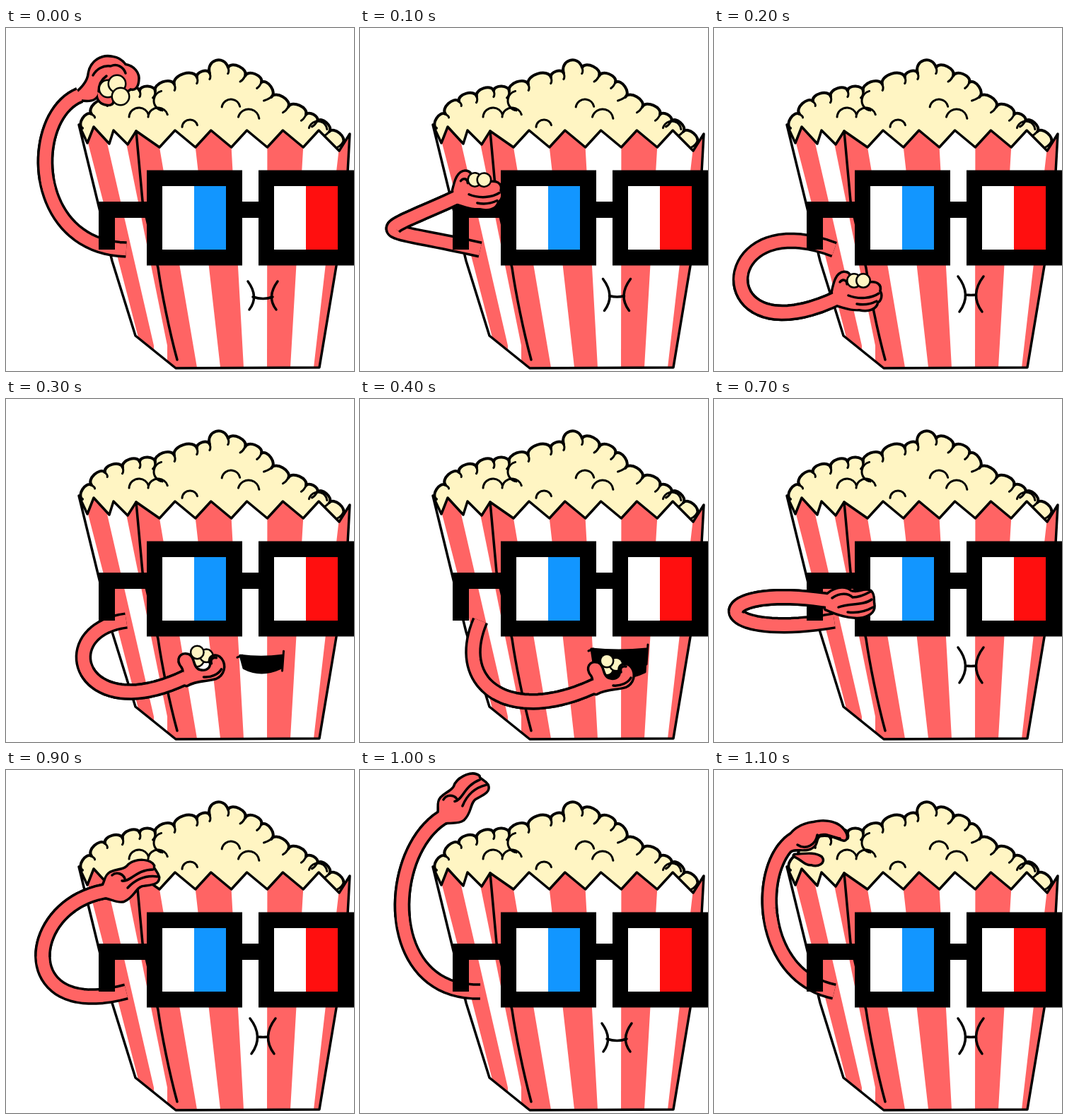
Write an HTML page with a canvas that moves like this. It is 492x486 px and loops after 1200 ms.

```html
<!DOCTYPE html>
<html lang="en">
<head>
<meta charset="utf-8">
<title>Popcorn snack</title>
<style>
html, body { margin: 0; width: 100%; height: 100%; overflow: hidden; background: #fff; }
canvas { display: block; width: 492px; height: 486px; }
</style>
</head>
<body>
<canvas id="stage" width="492" height="486"></canvas>
<script>
const ctx = document.getElementById('stage').getContext('2d');
const PINK = '#ff6464', CORN = '#fff5c3', INK = '#000';
const STEP = 50, LOOP = 1200, LAST = 1100;

const lerp = (a, b, k) => a + (b - a) * k;
const mix = (a, b, k) => a.map((v, i) => lerp(v, b[i], k));

function ink(path, width = 3.5, color = INK) {
  ctx.strokeStyle = color;
  ctx.lineWidth = width;
  ctx.stroke(path);
}

function fill(path, color) {
  ctx.fillStyle = color;
  ctx.fill(path);
}

function rect(color, x, y, w, h) {
  ctx.fillStyle = color;
  ctx.fillRect(x, y, w, h);
}

function poly(points, close = true) {
  const p = new Path2D();
  points.forEach(([x, y]) => p.lineTo(x, y));
  if (close) p.closePath();
  return p;
}

/* ---------- box ---------- */
const rim = [[103, 137], [115, 163], [124, 140], [146, 164], [152, 145], [172, 165], [184, 146]];
for (let i = 0; i < 6; i++) {
  rim.push([217 + 50.8 * i, 169 + (i === 5 ? 5 : 0)]);
  rim.push([239 + 50.8 * i - (i === 5 ? 7 : 0), 145 + (i === 5 ? 5 : 0)]);
}
const box = poly([...rim, [483, 205], [467, 337], [443, 481], [240, 482], [183, 436], [150, 330]]);
const fold = new Path2D('M184 146L193 245L215 340C220 375 231 430 242 470');

// Stripe edges run straight from the rim to the floor on each side of the box.
const sideEdge = i => [[116 + 27 * i, 140], [116 + 27 * i, 163], [190 + 19 * i, 450], [190 + 19 * i, 486]];
const frontEdge = i => [[217 + 50.8 * i, 130], [217 + 50.8 * i, 169], [270 + 33 * i, 481], [270 + 33 * i, 486]];
const stripe = (a, b) => poly([...a, ...b.reverse()]);
const stripes = [stripe(sideEdge(0), sideEdge(1)), stripe(sideEdge(2), frontEdge(0))];
for (let i = 1; i < 6; i += 2) stripes.push(stripe(frontEdge(i), frontEdge(i + 1)));

function drawBox() {
  fill(box, '#fff');
  ctx.save();
  ctx.clip(box);
  stripes.forEach(s => fill(s, PINK));
  ctx.restore();
  ink(fold);
  ink(box);
}

/* ---------- popcorn ---------- */
// Joints between the outer bumps; every bump ends in a short hook into the pile.
const joints = [[108, 142], [121, 122], [140, 104], [165, 97], [189, 89], [211, 90], [238, 80],
  [270, 70], [288, 64], [314, 56], [338, 68], [361, 77], [375, 98], [399, 112], [424, 123],
  [440, 132], [457, 147], [476, 163]];
const pile = new Path2D(), hooks = new Path2D();
pile.moveTo(...joints[0]);
for (let i = 1; i < joints.length; i++) {
  const [ax, ay] = joints[i - 1], [bx, by] = joints[i];
  const bulge = i === 9 ? .72 : .42;
  const ox = (by - ay) * bulge, oy = (ax - bx) * bulge;
  pile.bezierCurveTo(ax + ox, ay + oy, bx + ox, by + oy, bx, by);
  const reach = 9 / Math.hypot(ox, oy);
  hooks.moveTo(bx, by);
  hooks.quadraticCurveTo(bx - ox * reach * .7, by - oy * reach * .7, bx - ox * reach - 3, by - oy * reach);
}
const pileFill = new Path2D(pile);
pileFill.lineTo(470, 180);
pileFill.lineTo(115, 180);

// Inner kernels: centre, radius and lean of a rounded cap.
for (const [x, y, r, lean] of [[188, 127, 14, 0], [215, 127, 14, 0], [318, 114, 13, .1],
  [343, 130, 15, .2], [260, 141, 11, 0], [441, 145, 13, .2], [223, 103, 14, -1.5]]) {
  const cap = new Path2D();
  cap.arc(x, y, r, Math.PI * 1.02 + lean, Math.PI * 1.9 + lean);
  hooks.addPath(cap);
}

function drawPopcorn() {
  fill(pileFill, CORN);
  ink(pile, 4);
  ink(hooks, 3);
}

function drawLobes(lobes, r) {
  for (const [x, y] of lobes) {
    const p = new Path2D();
    p.arc(x, y, r, 0, Math.PI * 2);
    ink(p, 5);
    fill(p, CORN);
  }
}

/* ---------- glasses ---------- */
function lens(x, tint) {
  rect(INK, x, 201.5, 135, 135);
  rect('#fff', x + 22, 224, 45, 90);
  rect(tint, x + 67, 224, 45, 90);
}

function drawGlasses() {
  rect(INK, 131, 246, 70, 23);
  rect(INK, 131, 246, 23, 68);
  rect(INK, 330, 246, 30, 23);
  lens(199, '#1296ff');
  lens(357, '#ff0f0f');
}

/* ---------- hands ---------- */
const hand = (skin, lines, lobes = [], size = 0, behind = false) =>
  ({ skin: new Path2D(skin), lines: new Path2D(lines), lobes, size, behind });

const grab = hand(
  `M98 94C108 86 117 76 118 64C121 47 136 39 150 42C158 43 164 47 168 53C180 55 188 64 186 75
   C185 84 181 87 176 85L150 103C151 107 146 109 140 107C132 105 129 98 130 92C127 102 118 103 106 101Z`,
  'M123 67C128 58 137 53 147 54M148 54C157 50 166 55 169 64M131 90C131 80 135 73 142 68',
  [[144, 86], [157, 79], [162, 97]], 11);

const fist = hand(
  `M168 374C171 360 174 348 184 347C190 347 192 351 192 357L216 363C228 359 236 364 233 373
   C237 378 235 386 230 388C229 397 218 401 206 398C192 399 182 394 170 391Z`,
  'M190 379C205 385 223 383 233 376M202 391C212 393 222 391 230 387M178 360C182 355 188 357 188 363',
  [[198, 358], [211, 358]], 8.5);

const feed = hand(
  `M316 413C330 405 333 399 328 391C320 381 326 372 336 375C344 379 341 390 349 396
   C358 401 369 397 369 387C364 378 376 373 382 381C389 390 385 403 375 407C362 411 348 409 334 417Z`,
  'M358 406C369 407 379 402 383 395M369 387C367 380 372 378 376 379',
  [[349, 382], [362, 376], [349, 371]], 8, true);

const open = hand(
  `M228 388C238 384 239 373 246 365C254 358 266 361 264 370C263 378 257 384 260 390
   C272 390 280 377 290 376C298 375 300 382 295 388C303 391 301 402 295 406C284 412 258 409 232 406Z`,
  'M262 400C276 402 292 398 297 388M252 389C262 393 274 390 281 384');

const reach = hand(
  `M158 280C168 269 184 265 193 273C204 277 212 269 221 273C226 278 224 284 225 290
   C227 300 221 305 210 308C192 311 172 303 158 297Z`,
  'M167 282C178 274 190 275 196 281C206 281 214 277 221 273M176 295C191 289 211 293 223 284M189 302C204 304 216 300 225 295');

const flat = hand(
  `M134 168C142 162 139 151 148 146C160 141 168 143 174 135C184 127 203 127 208 136
   C206 140 213 144 215 152C215 161 206 161 192 163C182 166 180 179 166 185C158 187 150 182 141 180Z`,
  'M150 149C157 143 166 148 168 154M164 157C176 159 184 141 208 141M172 167C184 154 198 149 214 151');

const dip = hand(
  `M102 103C110 85 124 77 142 75C158 71 176 75 183 86C189 94 187 100 182 98
   C174 96 166 90 150 92C142 95 146 104 140 108C130 116 118 109 108 114Z
   M114 121C126 121 140 117 151 124C157 131 146 136 138 133C130 134 126 127 114 121Z`,
  'M118 106C130 114 144 106 146 92M148 93C157 88 168 96 178 97');

/* ---------- poses ---------- */
// An arm is one cubic from the shoulder: two control points and the wrist.
const SHOULDER = [170, 314];
const heading = arm => Math.atan2(arm[5] - arm[3], arm[4] - arm[2]);
const poses = [];
function pose(t, arm, hand, chew, gape) {
  hand.home ??= arm;
  poses.push({ t, arm, hand, mouth: [chew, gape] });
}

const feeding = [130, 408, 215, 462, 333, 406];
pose(0, [32, 310, 30, 125, 104, 95], grab, 0, 0);
pose(200, [-5, 247, -10, 472, 176, 382], fist, 1, 0);
pose(400, feeding, feed, 1, 1);
pose(500, feeding, feed, 1, 1);
pose(600, [40, 305, 107, 475, 238, 395], open, 1, .62);
pose(700, [-15, 345, -15, 257, 168, 287], reach, 1, 0);
pose(900, [8, 358, 25, 186, 146, 171], flat, 1, 0);
pose(1000, [28, 318, 35, 110, 122, 64], flat, 0, 0);
pose(1100, [60, 291, 59, 131, 114, 98], dip, 1, 0);

function poseAt(t) {
  const i = Math.min(poses.length - 2, poses.filter(p => p.t <= t).length - 1);
  const a = poses[i], b = poses[i + 1], k = (t - a.t) / (b.t - a.t);
  return {
    arm: mix(a.arm, b.arm, k),
    hand: (k < .5 ? a : b).hand,
    mouth: mix(a.mouth, b.mouth, k)
  };
}

/* ---------- arm ---------- */
function armPath(arm, from) {
  const points = [];
  for (let i = from * 40; i <= 40; i++) {
    const k = i / 40, j = 1 - k;
    points.push([0, 1].map(c => j ** 3 * SHOULDER[c] + 3 * j * j * k * arm[c]
      + 3 * j * k * k * arm[c + 2] + k ** 3 * arm[c + 4]));
  }
  return poly(points, false);
}

// The fill may start earlier than the outline so that a joint leaves no seam.
function drawArm(arm, from, fillFrom = from) {
  ctx.lineCap = 'butt';
  ink(armPath(arm, from), 23.5);
  ink(armPath(arm, fillFrom), 16.5, PINK);
  ctx.lineCap = 'round';
}

function drawReach(arm, hand) {
  const { home } = hand;
  const place = paint => {
    ctx.save();
    ctx.translate(arm[4], arm[5]);
    ctx.rotate(heading(arm) - heading(home));
    ctx.translate(-home[4], -home[5]);
    paint();
    ctx.restore();
  };
  place(() => {
    if (hand.behind) drawLobes(hand.lobes, hand.size);
    ink(hand.skin, 7);
  });
  drawArm(arm, .5, .45);
  place(() => {
    fill(hand.skin, PINK);
    ink(hand.lines);
    if (!hand.behind) drawLobes(hand.lobes, hand.size);
  });
}

/* ---------- mouth ---------- */
function drawClosed(chew) {
  const top = lerp(359, 352, chew), base = lerp(399, 402, chew);
  const y = lerp(381, 378, chew), half = lerp(21, 18, chew), gap = lerp(14, 7, chew);
  const bracket = side => `M${363 + side * half} ${top}
    Q${363 + side * (gap - 9)} ${y} ${363 + side * (half - 2)} ${base}`;
  ink(new Path2D(`${bracket(-1)}${bracket(1)}M${363 - gap} ${y}Q364 ${lerp(386, 379, chew)} ${363 + gap} ${y}`));
}

function drawOpen(gape, chewing) {
  const k = (gape - .62) / .38;
  const cx = lerp(362, 366, k), half = lerp(32, 39, k);
  const top = lerp(361, 354, k), base = lerp(390, 398, k);
  const l = cx - half, r = cx + half, side = lerp(top, base, .75);
  const shape = new Path2D(`M${l} ${top}Q${cx} ${top + 4} ${r} ${top}L${r - 2} ${side}
    Q${cx} ${base + 7} ${l + 5} ${side}Z`);
  fill(shape, INK);
  ink(shape, 3);
  ink(new Path2D(`M${l - 4} ${top + 3}L${l + 3} ${top}M${r} ${top + 22}L${r + 2} ${top - 6}`), 3);
  if (chewing) drawLobes([[350, 378], [365, 378]], 9);
}

/* ---------- loop ---------- */
function draw(t) {
  const { arm, hand, mouth: [chew, gape] } = poseAt(t);
  rect('#fff', 0, 0, 492, 486);
  drawPopcorn();
  drawBox();
  if (gape < .2) drawClosed(chew);
  else drawOpen(gape, t >= 600);
  drawArm(arm, 0);
  drawGlasses();
  drawReach(arm, hand);
}

ctx.lineJoin = 'round';
ctx.lineCap = 'round';
const start = performance.now();
function tick() {
  const t = (performance.now() - start) % LOOP;
  draw(Math.min(LAST, Math.floor(t / STEP) * STEP));
  requestAnimationFrame(tick);
}
tick();
</script>
</body>
</html>
```
